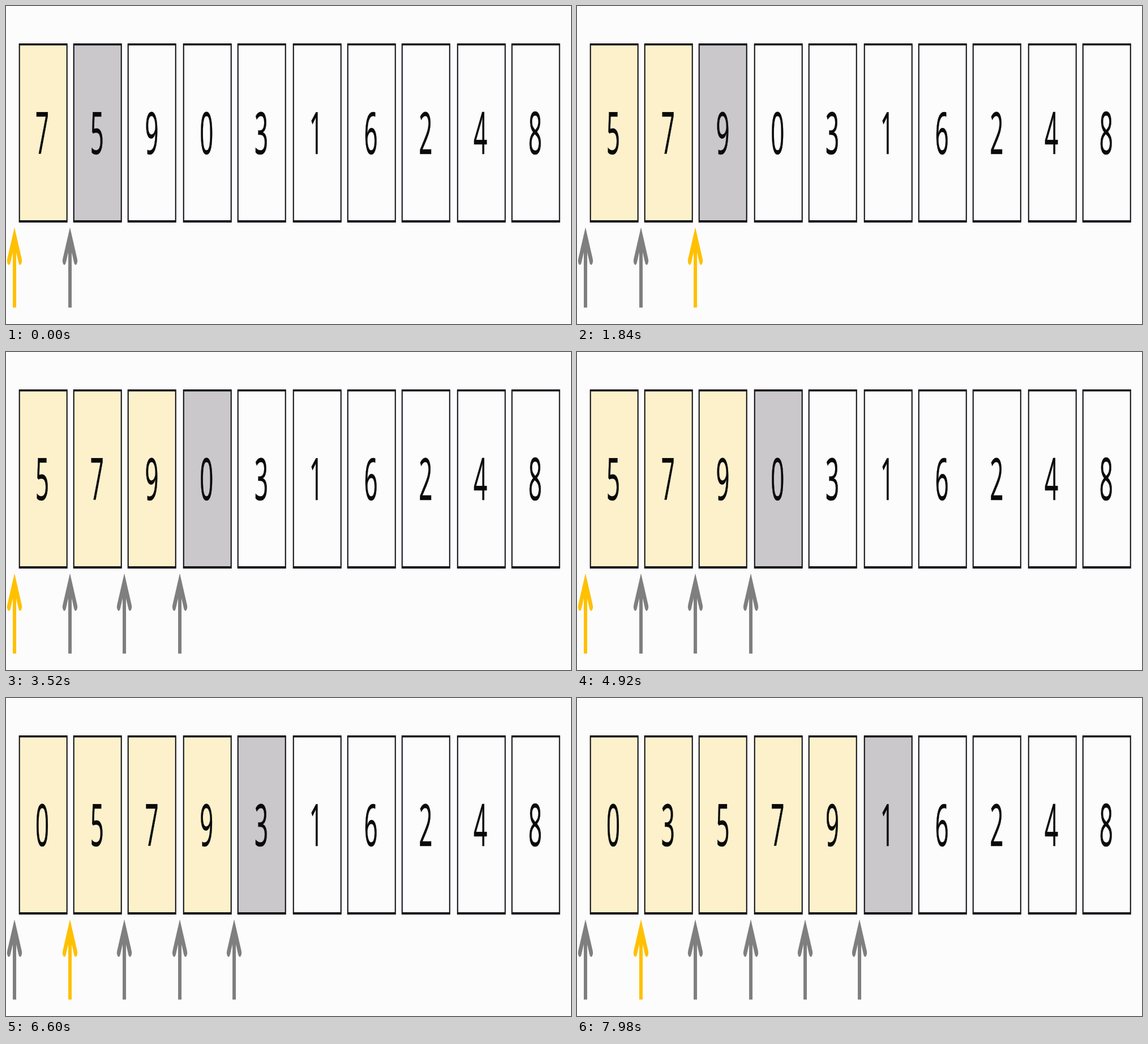
These frames come from a looping animation (998 px wide and 561 px high, 8 s). An HTML page:

```html
<!DOCTYPE html>
<html lang="en">
<head>
<meta charset="utf-8">
<title>Insertion sort</title>
<style>
  html, body { margin: 0; width: 100%; height: 100%; overflow: hidden; background: #fcfcfc; }
  svg { display: block; width: 100vw; height: 100vh; }
  text { font: 42px "Open Sans", "Noto Sans", sans-serif; text-anchor: middle; fill: #0a0a0a; stroke: #0a0a0a; stroke-width: .3; }
  .head { fill: none; stroke-width: 6.2; stroke-linecap: round; stroke-linejoin: miter; }
  .shaft { fill: none; stroke-width: 6; }
</style>
</head>
<body>
<svg id="stage" viewBox="0 0 998 561"></svg>
<script>
const LOOP = 8000;
const CUTS = [1560, 3480, 5300, 7140];
const START = [7, 5, 9, 0, 3, 1, 6, 2, 4, 8];
const SORTED = '#fcf1cb', KEY = '#cac8ca', PLAIN = '#fcfcfc';
const GOLD = '#ffc000', GRAY = '#7f7f7f';

// Columns sit on a two-pixel grid.
const column = (offset, i) => 2 * Math.floor(offset + 48.36 * i);

function cell(digit, i, fill) {
  const x = column(11.2, i) + 0.7;
  const textX = 64 + 96.75 * i;
  return `<rect x="${x}" y="66" width="86" height="316" fill="#0c0a12"/>
    <rect x="${x + 2}" y="69.5" width="82" height="308.5" fill="${fill}"/>
    <text transform="translate(${textX} 261) scale(1 2.43)">${digit}</text>`;
}

function arrow(i, color) {
  return `<g transform="translate(${column(7.95, i) + 1} 406) scale(1 2.4)" stroke="${color}">
    <path class="head" d="M-9.9 18L0 0L9.9 18"/>
    <path class="shaft" d="M0 0V52.5"/></g>`;
}

// One picture per step: the sorted part, the key after it, and its possible slots.
function drawStep(step) {
  const count = step + 1;
  const sorted = START.slice(0, count).sort((a, b) => a - b);
  const digits = [...sorted, ...START.slice(count)];
  const slot = sorted.filter(d => d < digits[count]).length;
  const cells = digits.map((d, i) =>
    cell(d, i, i < count ? SORTED : i === count ? KEY : PLAIN));
  const arrows = Array.from({ length: count + 1 }, (_, i) =>
    arrow(i, i === slot ? GOLD : GRAY));
  return cells.join('') + arrows.join('');
}

const stage = document.getElementById('stage');
let shown = -1;

function render(now) {
  const time = now % LOOP;
  const step = CUTS.filter(cut => time >= cut).length;
  if (step !== shown) {
    stage.innerHTML = drawStep(step);
    shown = step;
  }
}

const begin = performance.now();
function tick() {
  render(performance.now() - begin);
  requestAnimationFrame(tick);
}
tick();
</script>
</body>
</html>
```
